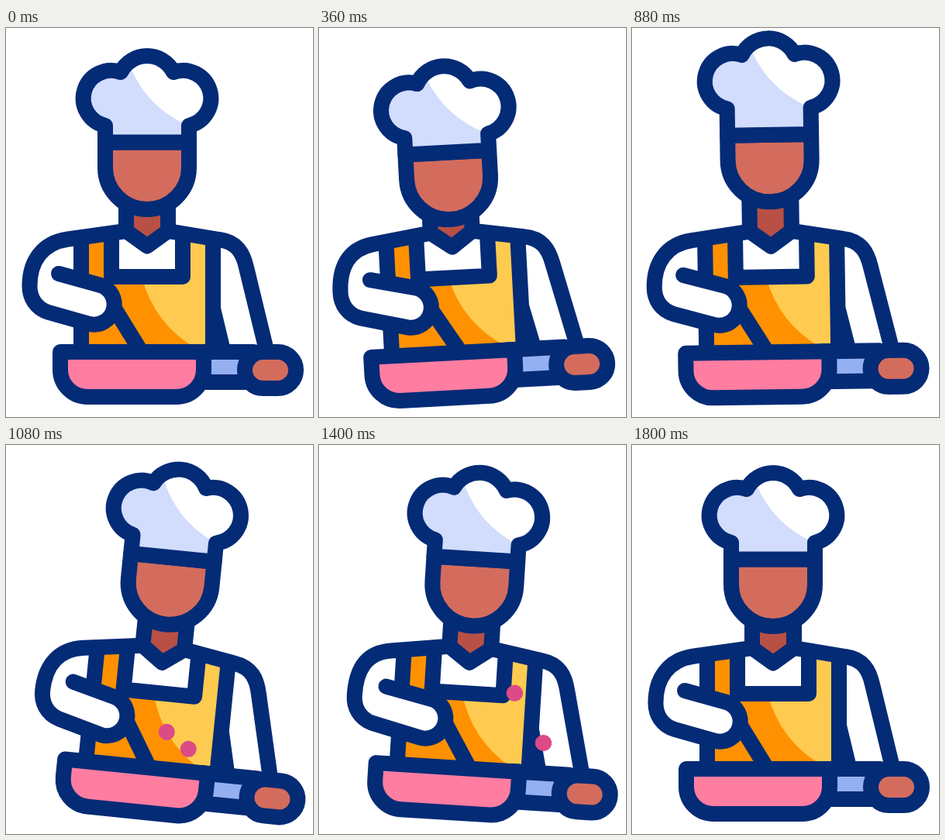
Recreate the animation shown at these times as an HTML page. Size 396 by 502 pixels, loop 1840 ms.

```html
<!DOCTYPE html>
<html lang="en">
<head>
<meta charset="utf-8">
<title>Cooking chef</title>
<style>
  html, body { margin: 0; height: 100%; overflow: hidden; background: #fff; }
  svg { display: block; width: 100vw; height: 100vh; }
  .line { stroke: #042b76; stroke-width: 20; stroke-linecap: round; stroke-linejoin: round; }
  .food { stroke: #dc4a87; stroke-width: 21; stroke-linecap: round; }
</style>
</head>
<body>
<svg viewBox="0 0 396 502" fill="none">
  <g id="chef">
    <!-- torso and apron -->
    <path fill="#ff9100" d="M97 268H136V321H228V268H267V412H97z"/>
    <path fill="#fecb50" d="M175 321Q191 381 243 412H267V268H228V321z"/>
    <path fill="#b85045" d="M155 200H209V262L182 282L155 262z"/>
    <path class="line" d="M97 273V412M267 273V412M267 362L279 412M136 266V321H228V266"/>
    <path class="line" d="M209 262L275 273C298 276 306 291 310 309L335 412"/>
    <path class="line" d="M155 220V262L182 281.500L209 262V220"/>

    <!-- head and hat -->
    <g id="head">
      <path class="line" fill="#d46c5d" d="M128 147.500V180a54 54 0 0 0 108 0V147.500z"/>
    </g>
    <path id="hat" fill="#d2dcfc"/>
    <path id="shine" fill="#fff" d="M161 52Q182 101 231 124L236 126a36 36 0 1 0 -20 -69a38 38 0 0 0 -55 -12z"/>
    <path id="hatLine" class="line"/>

    <!-- stirring arm -->
    <path id="spoon" class="line" d="M140 362L172 414"/>
    <path id="forearm" fill="#fff"/>
    <path id="arm" class="line"/>

    <!-- pan -->
    <path class="line" fill="#94b0f0" d="M245 418H320V457H245z"/>
    <path class="line" fill="#ff7da1" d="M70 418H255V441a35 35 0 0 1 -35 35H105a35 35 0 0 1 -35 -35z"/>
    <rect class="line" fill="#d46c5d" x="308" y="418" width="66" height="47" rx="23.500"/>

    <path class="food" pathLength="1" d="M197 370Q206 328 243 317"/>
    <path class="food" pathLength="1" d="M227 389Q248 374 284 379"/>
  </g>
</svg>
<script>
const LOOP = 1840, STEP = 40;
const $ = id => document.getElementById(id);
const foods = document.querySelectorAll('.food');
const clamp = x => Math.min(1, Math.max(0, x));
const ease = x => (1 - Math.cos(Math.PI * clamp(x))) / 2;

// Eased value between [time, value] keys.
function track(t, keys) {
  let value = keys[0][1];
  for (let i = 1; i < keys.length; i++) {
    const [t0, v0] = keys[i - 1], [t1, v1] = keys[i];
    value += (v1 - v0) * ease((t - t0) / (t1 - t0));
  }
  return value;
}

function drawHat(puff, head) {
  const d = `M128 ${147.5 + head}V${126 + puff}a36 36 0 1 1 20 -69` +
    `a38 38 0 0 1 68 0a36 36 0 1 1 20 69V${147.5 + head}z`;
  $('hat').setAttribute('d', d);
  $('hatLine').setAttribute('d', d);
  $('shine').setAttribute('transform', `translate(0 ${puff})`);
  $('head').setAttribute('transform', `translate(0 ${head})`);
}

function drawArm(reach) {
  const hand = 17 * reach, elbow = 6.5 * reach;
  const forearm = `M${68 + 9 * reach} ${317 + 2 * reach}L${122 + hand} 332` +
    `a26 26 0 0 1 -14 50L${55 + elbow} 367`;
  const x = 30.5 + elbow;
  $('forearm').setAttribute('d', forearm + 'z');
  $('arm').setAttribute('d', forearm + `C${x + 8} 362 ${x} 348 ${x} 333C${x} 301 47 277 80 272.500L155 262`);
  $('spoon').setAttribute('transform', `translate(${hand} 0)`);
}

// Each piece stretches out along its path, then its tail catches up.
function drawFood(t) {
  const u = (t - (t < 900 ? 390 : 1080)) / 330;
  const front = ease(u / 0.6), tail = ease((u - 0.4) / 0.6);
  for (const food of foods) {
    food.style.display = u >= 0 && u < 1 ? '' : 'none';
    food.style.strokeDasharray = `${Math.max(0.001, front - tail)} 3`;
    food.style.strokeDashoffset = -Math.min(tail, 0.998);
  }
}

function draw(now) {
  const t = Math.floor(now % LOOP / STEP) * STEP;
  const tilt = track(t, [[100, 0], [620, -6.1], [670, -6.1], [1130, 6.1], [1160, 6.1], [1700, 0]]);
  const head = track(t, [[110, 0], [380, 12], [900, -10], [1160, 0]]);
  const puff = track(t, [[110, 0], [380, 12], [900, -23], [1160, 0]]);
  const stir = clamp((t - 110) / 1650) * 2;
  $('chef').setAttribute('transform', `rotate(${tilt} 198 473)`);
  drawHat(puff, head);
  drawArm((1 - Math.cos(2 * Math.PI * stir)) / 2);
  drawFood(t);
}

const start = performance.now();
function frame() {
  draw(performance.now() - start);
  requestAnimationFrame(frame);
}
frame();
</script>
</body>
</html>
```
